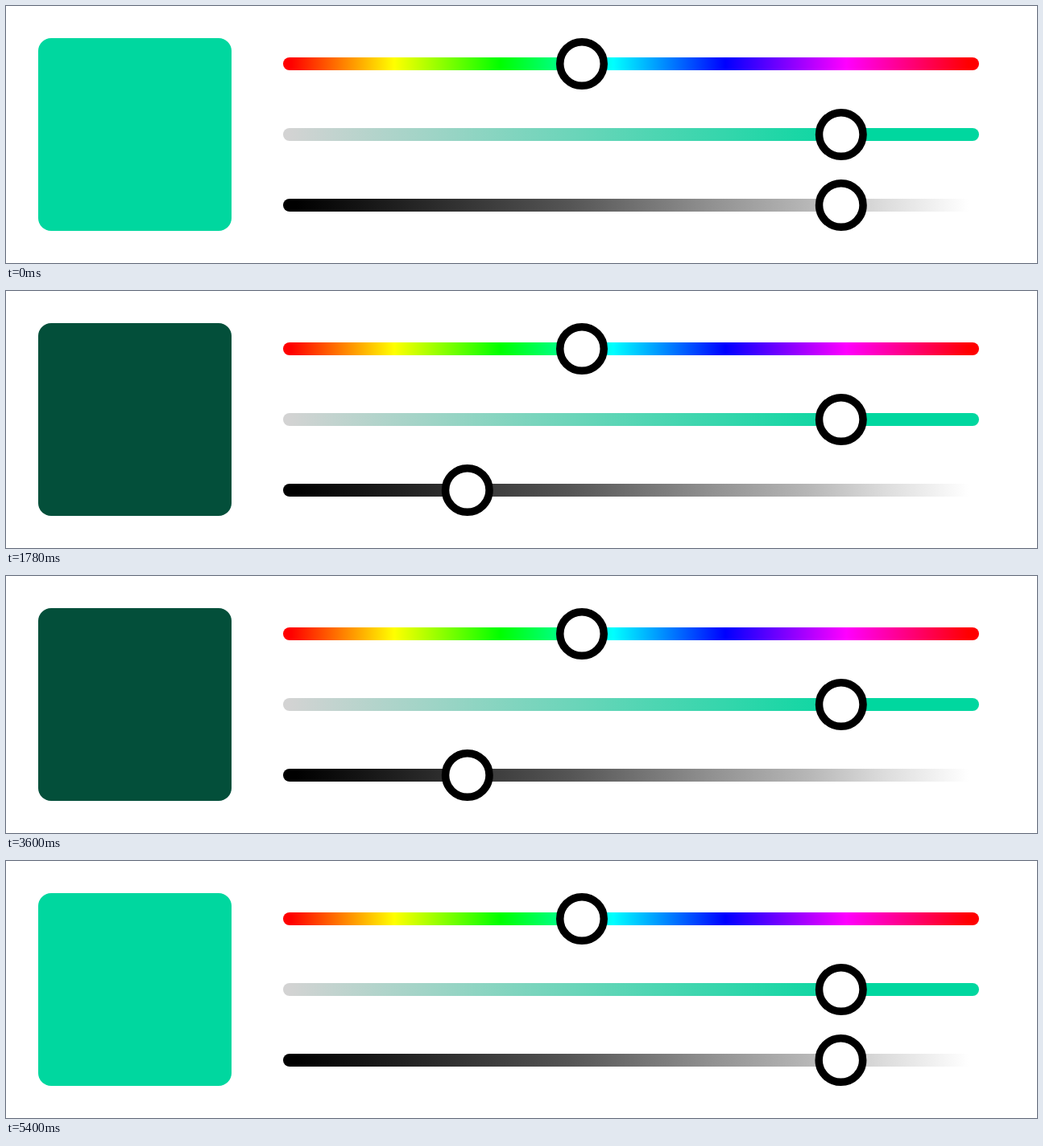
An HTML page that plays this animation: 1280 px wide and 320 px high, repeating every 5.42 s.

```html
<!DOCTYPE html>
<html lang="en">
<head>
<meta charset="utf-8">
<title>Colour sliders</title>
<style>
  html, body { margin: 0; width: 100%; height: 100%; overflow: hidden; background: #fff; }
  svg { display: block; width: 100%; height: 100%; }
  .knob { fill: #fff; stroke: #000; stroke-width: 9.5; }
</style>
</head>
<body>
<svg id="stage" viewBox="0 0 1280 320"></svg>
<script>
const LOOP = 5420, MOVE = 1150, DOWN = 567, UP = 4275;
const BRIGHT = { x: 1036.8, rgb: [0, 215, 159] };
const DARK = { x: 572.8, rgb: [3, 79, 58] };

// Each slider: knob position and gradient stops as [x, colour]
const sliders = [
  { x: 715, stops: [[354, '#f00'], [482, '#ff0'], [614, '#0f0'], [754, '#0ff'],
                    [893, '#00f'], [1043, '#f0f'], [1195, '#f00']] },
  { x: BRIGHT.x, stops: [[350, '#d3d3d3'], [1070, '#00d79f']] },
  { x: BRIGHT.x, stops: [[360, '#000'], [540, '#2d2d2d'], [700, '#555'], [870, '#8f8f8f'],
                         [1000, '#b8b8b8'], [1090, '#dcdcdc'], [1195, '#fff']] }
];

const slider = ({ x, stops }, i) => {
  const y = 72 + 88 * i;
  const marks = stops.map(([at, color]) =>
    `<stop offset="${(at - 344) / 864}" stop-color="${color}"/>`).join('');
  return `<linearGradient id="g${i}">${marks}</linearGradient>
    <rect x="344" y="${y - 8}" width="864" height="16" rx="8" fill="url(#g${i})"/>
    <circle class="knob" id="knob${i}" cx="${x}" cy="${y}" r="27.25"/>`;
};

document.getElementById('stage').innerHTML =
  '<rect id="swatch" x="40" y="40" width="240" height="240" rx="16"/>' +
  sliders.map(slider).join('');

const swatch = document.getElementById('swatch');
const knob = document.getElementById('knob2');
const mix = (a, b, k) => a + (b - a) * k;

// cubic-bezier(.42, 0, .58, 1)
function ease(p) {
  p = Math.min(1, Math.max(0, p));
  let lo = 0, hi = 1;
  for (let i = 0; i < 24; i++) {
    const s = (lo + hi) / 2, r = 1 - s;
    const x = 3 * r * r * s * .42 + 3 * r * s * s * .58 + s ** 3;
    if (x < p) lo = s; else hi = s;
  }
  return lo * lo * (3 - 2 * lo);
}

function draw(now) {
  const t = now % LOOP;
  const k = t < DOWN ? 0 : ease((t - DOWN) / MOVE) - ease((t - UP) / MOVE);
  knob.setAttribute('cx', mix(BRIGHT.x, DARK.x, k));
  const rgb = BRIGHT.rgb.map((c, i) => Math.round(mix(c, DARK.rgb[i], k)));
  swatch.setAttribute('fill', `rgb(${rgb})`);
}

const start = performance.now();
function tick() {
  draw(performance.now() - start);
  requestAnimationFrame(tick);
}
tick();
</script>
</body>
</html>
```
